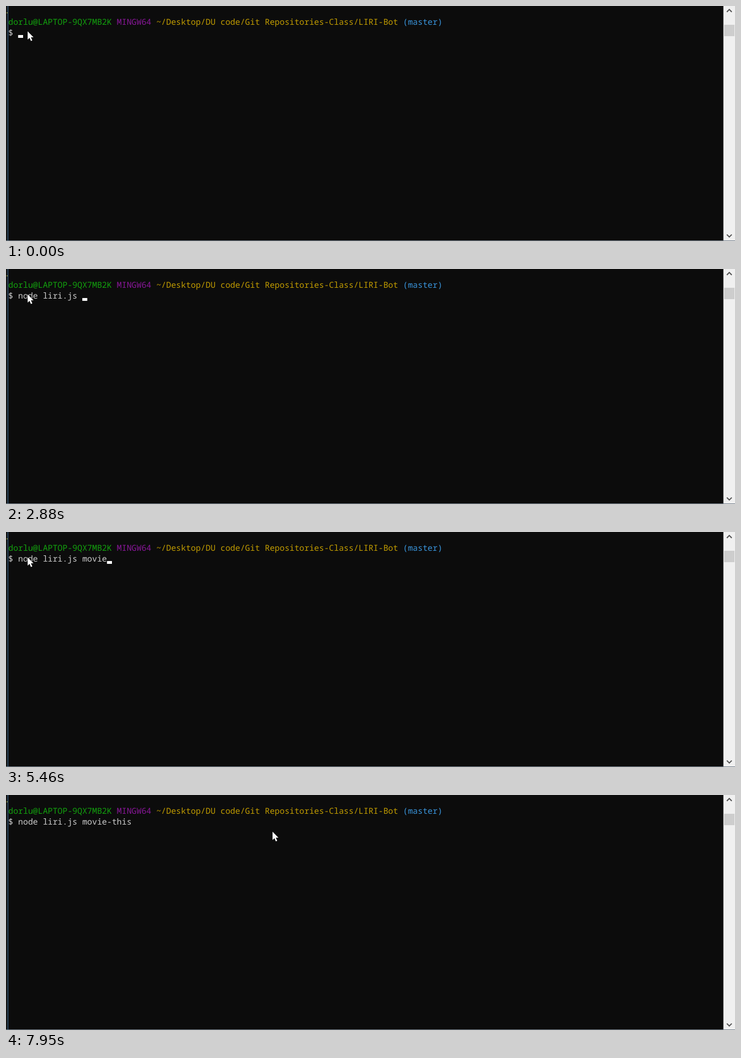
These frames come from a looping animation (1280 px wide and 413 px high, 8 s). An HTML page:

```html
<!DOCTYPE html>
<html lang="en">
<head>
<meta charset="utf-8">
<title>Terminal</title>
<style>
  html, body { margin: 0; width: 100%; height: 100%; overflow: hidden; background: #0c0c0c; }
  svg { display: block; width: 100vw; height: 100vh; }
  text {
    font: 14.445px "Noto Sans Mono", "DejaVu Sans Mono", monospace;
    white-space: pre;
    text-rendering: geometricPrecision;
    fill: #ccc;
  }
  .user { fill: #13a10e; }
  .system { fill: #881798; }
  .path { fill: #c19c00; }
  .branch { fill: #3a96dd; }
</style>
</head>
<body>
<svg viewBox="0 0 1280 413">
  <rect width="1280" height="413" fill="#0c0c0c"/>
  <rect width="3" height="413" fill="#171819"/>
  <rect x="3" width="1" height="413" fill="#38658f"/>
  <rect x="1" y="11" width="2" height="2" fill="#77752c"/>

  <text x="4" y="33"><tspan class="user">dorlu@LAPTOP-9QX7MB2K</tspan> <tspan class="system">MINGW64</tspan> <tspan class="path">~/Desktop/DU code/Git Repositories-Class/LIRI-Bot</tspan> <tspan class="branch">(master)</tspan></text>
  <text x="4" y="52" id="command"></text>
  <rect id="caret" y="51" width="8.67" height="5" fill="#fff"/>

  <rect y="412" width="1280" height="1" fill="#75808c"/>
  <rect x="1259.6" width="20.4" height="412" fill="#f0f0f0"/>
  <rect x="1261" y="33" width="18" height="20" fill="#cdcdcd"/>
  <path d="M1265.7 10.5l4.3-4.3 4.3 4.3M1265.7 401.7l4.3 4.3 4.3-4.3" fill="none" stroke="#505050" stroke-width="1.9"/>

  <path id="pointer" d="M0 0V14.5L3.3 11.4 5.8 17 8.2 16 5.8 10.6H10.3Z"
        fill="#fff" stroke="#0c0c0c" stroke-width="1.4" paint-order="stroke"/>
</svg>
<script>
const LOOP = 8000;
const CELL = 8.667;
const BLINK = 519;
const BLINK_OFFSET = 200;
const POINTER_JUMP = 7950;

// Each burst is typed at an even pace; a pace of 0 is a tab completion.
const bursts = [
  { text: "node", start: 400, pace: 329 },
  { text: " l", start: 2200, pace: 270 },
  { text: "iri.js ", start: 2880, pace: 0 },
  { text: "movie", start: 4480, pace: 245 },
  { text: "-this", start: 6330, pace: 255 }
];
const keys = bursts.flatMap(({ text, start, pace }) =>
  [...text].map((char, i) => ({ char, time: start + i * pace })));

const [command, caret, pointer] =
  ["command", "caret", "pointer"].map(id => document.getElementById(id));

const blinkCount = time => Math.floor((time - BLINK_OFFSET) / BLINK);

function draw(time) {
  const typed = keys.filter(key => key.time <= time);
  command.textContent = "$ " + typed.map(key => key.char).join("");

  // A key press shows the caret, and each tick of the blink timer toggles it.
  const lastKey = typed.length ? typed[typed.length - 1].time : 0;
  const hidden = (blinkCount(time) - blinkCount(lastKey)) % 2;
  caret.setAttribute("x", 4 + CELL * (2 + typed.length));
  caret.setAttribute("visibility", hidden ? "hidden" : "visible");

  pointer.setAttribute("transform",
    time < POINTER_JUMP ? "translate(38 44.5)" : "translate(468 64.5)");
}

const origin = performance.now();
function tick() {
  draw((performance.now() - origin) % LOOP);
  requestAnimationFrame(tick);
}
tick();
</script>
</body>
</html>
```
